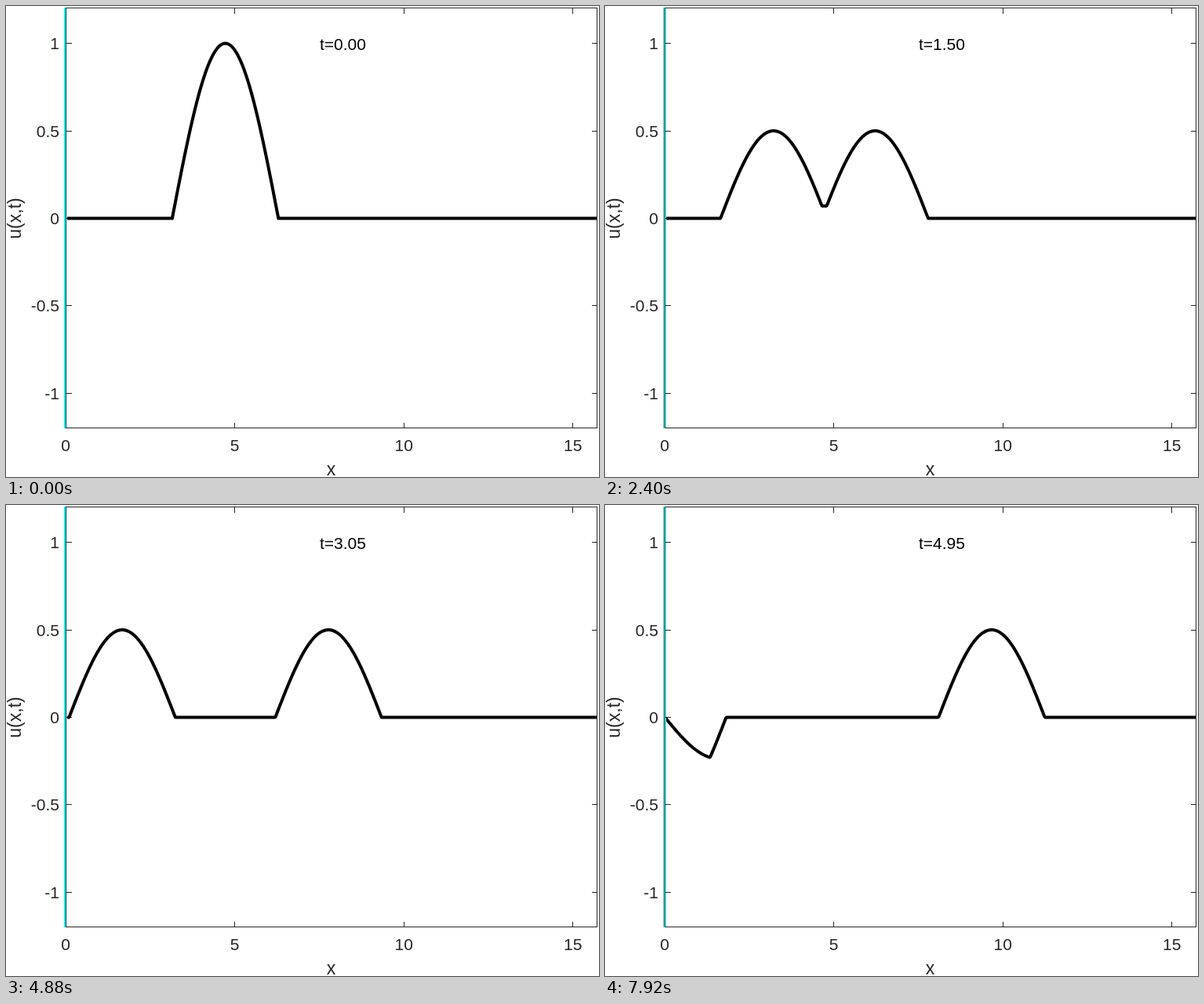
Write an HTML page that moves like this. It is 756 by 600 pixels and loops after 8 s.

```html
<!DOCTYPE html>
<html lang="en">
<head>
<meta charset="utf-8">
<title>Wave with a fixed end</title>
<style>
  html, body { margin: 0; width: 100%; height: 100%; overflow: hidden; background: #fff; }
  svg { display: block; }
  text { font: 21px "Liberation Sans", Arial, sans-serif; fill: #262626; }
  .label { font-size: 23px; }
  .mid { text-anchor: middle; }
  .end { text-anchor: end; }
</style>
</head>
<body>
<svg width="756" height="600" viewBox="0 0 756 600">
  <clipPath id="area"><rect x="78" y="2" width="675" height="536"/></clipPath>
  <path d="M75.5 2V538" stroke="#0ff" stroke-width="3"/>
  <path id="axes" fill="none" stroke="#262626" shape-rendering="crispEdges"/>
  <path id="wave" fill="none" stroke="#000" stroke-width="4" stroke-linejoin="round" clip-path="url(#area)"/>
  <g id="ticks"></g>
  <text class="label mid" x="414.5" y="598">x</text>
  <text class="label mid" transform="translate(19 270.5) rotate(-90)">u(x,t)</text>
  <text id="clock" x="400" y="56" style="fill:#000"></text>
</svg>
<script>
const $ = id => document.getElementById(id);
const LENGTH = 5 * Math.PI, STEP_MS = 80, STEPS = 100, DT = 0.05;
const px = x => 76.5 + x * 677 / LENGTH;
const py = u => 270.5 - u * 222.9;

function addText(cls, x, y, value) {
  const t = document.createElementNS("http://www.w3.org/2000/svg", "text");
  t.setAttribute("class", cls);
  t.setAttribute("x", x);
  t.setAttribute("y", y);
  t.textContent = value;
  $("ticks").append(t);
}

let axes = "M76.5 2.5H753.5V537.5H76.5Z";
for (const x of [0, 5, 10, 15]) {
  const p = Math.floor(px(x)) + 0.5;
  axes += `M${p} 537.5v-7M${p} 2.5v7`;
  addText("mid", px(x) - 0.3, 567, x);
}
for (const u of [-1, -0.5, 0, 0.5, 1]) {
  const p = Math.floor(py(u)) + 0.5;
  axes += `M76.5 ${p}h7M753.5 ${p}h-7`;
  addText("end", 68, py(u) + 7.5, u);
}
$("axes").setAttribute("d", axes);

// Initial hump, extended as an odd function to keep u(0,t) = 0
const hump = x => x < 0 ? -hump(-x) : x > Math.PI && x < 2 * Math.PI ? -Math.sin(x) : 0;
const u = (x, t) => (hump(x - t) + hump(x + t)) / 2;

function draw(now) {
  const t = Math.floor(now / STEP_MS) % STEPS * DT;
  const points = [];
  for (let i = 0; i <= 700; i++) {
    const x = i / 700 * LENGTH;
    points.push(px(x).toFixed(2) + " " + py(u(x, t)).toFixed(2));
  }
  $("wave").setAttribute("d", "M" + points.join("L"));
  $("clock").textContent = "t=" + t.toFixed(2);
}

const start = performance.now();
function loop(now) {
  draw(Math.max(0, now - start));
  requestAnimationFrame(loop);
}
draw(0);
requestAnimationFrame(loop);
</script>
</body>
</html>
```
